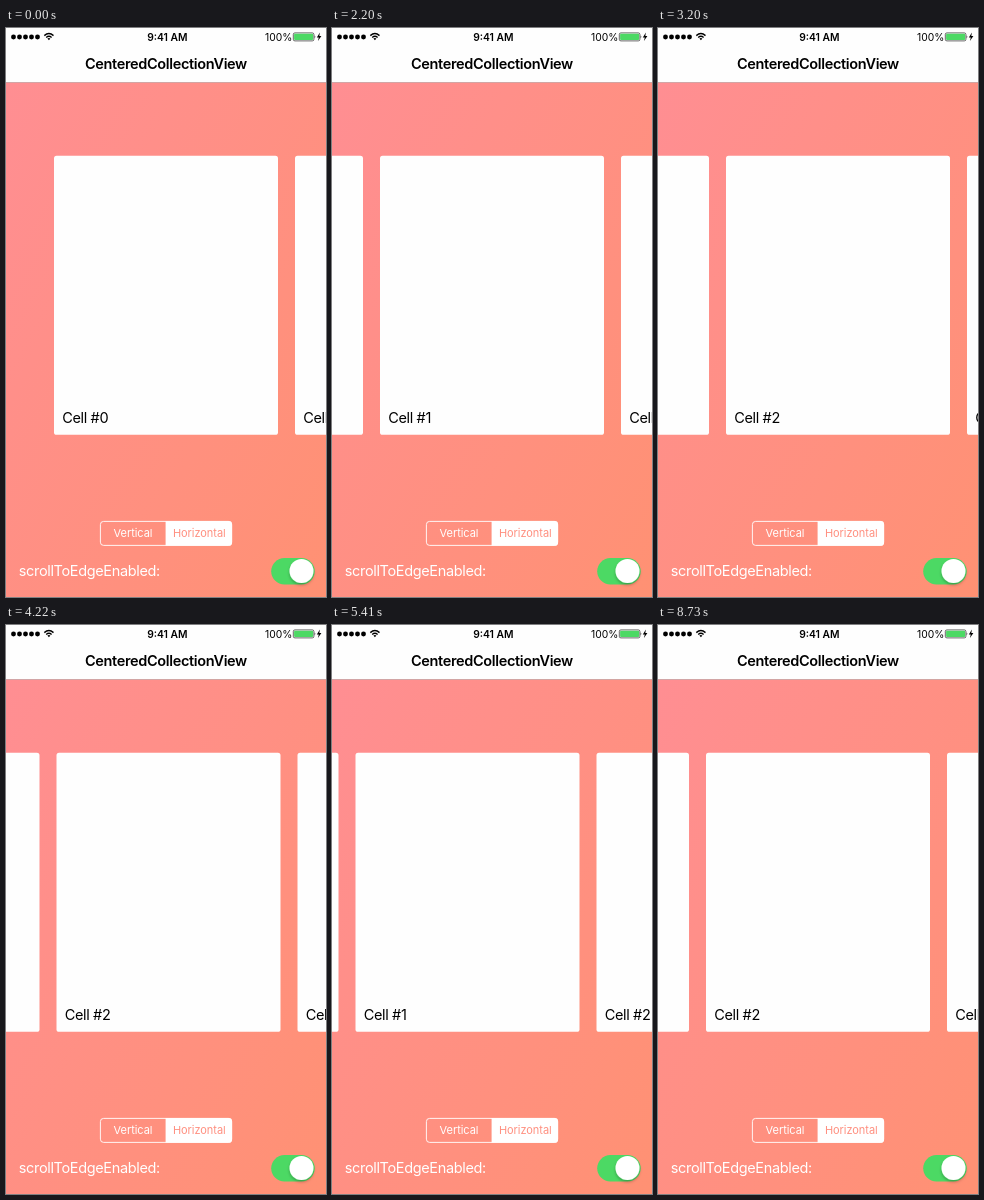
An HTML page that plays this animation: 320x569 px, repeating every 8780 ms.

```html
<!DOCTYPE html>
<html lang="en">
<head>
<meta charset="utf-8">
<title>CenteredCollectionView</title>
<style>
  html, body { margin: 0; width: 100%; height: 100%; overflow: hidden; }
  svg { display: block; width: 320px; height: 569px; }
  text { font-family: Inter, sans-serif; font-size: 14.5px; letter-spacing: -.35px; }
  .small { font-size: 11px; letter-spacing: -.05px; text-anchor: middle; }
  .status { font-size: 10.3px; letter-spacing: 0; }
  .bold { font-weight: 600; text-anchor: middle; }
</style>
</head>
<body>
<svg viewBox="0 0 320 569">
  <defs>
    <linearGradient id="coral" x1="0" y1="0" x2="1" y2="1">
      <stop offset="0" stop-color="#ff8e94"/>
      <stop offset="1" stop-color="#ff9173"/>
    </linearGradient>
    <filter id="soft" x="-30%" y="-30%" width="160%" height="170%">
      <feDropShadow dx="0" dy="1.8" stdDeviation="1.4" flood-opacity=".28"/>
    </filter>
  </defs>
  <rect width="320" height="569" fill="url(#coral)"/>
  <g id="cells"></g>

  <rect width="320" height="54.2" fill="#fefefe"/>
  <rect y="54" width="320" height=".6" fill="#b5a5a5"/>
  <text class="bold" x="160" y="41">CenteredCollectionView</text>

  <g id="dots"></g>
  <g fill="none" stroke="#000" stroke-width="1.4">
    <path d="M38.3 7.6Q42.9 3.6 47.5 7.6M40.2 9.5Q42.9 7.2 45.6 9.5"/>
    <path d="M41.4 10.6Q42.9 9.4 44.4 10.6L42.9 12.2Z" fill="#000" stroke="none"/>
  </g>
  <text class="status bold" x="161.3" y="12.7">9:41 AM</text>
  <text class="status" x="259" y="12.7">100%</text>
  <rect x="287.3" y="4.9" width="20.6" height="8" rx="1.6" fill="none" stroke="#000" stroke-width=".6"/>
  <rect x="288.1" y="5.7" width="19" height="6.4" rx=".8" fill="#4cd964"/>
  <path d="M308.7 7.3q1.3 1.6 0 3.2z"/>
  <path d="M313.9 4.6L310.8 9.4H312.8L311.9 13L315.4 8H313.3Z"/>

  <rect x="94.4" y="493.4" width="131.2" height="24" rx="3.2" fill="none" stroke="#fff" stroke-width=".9"/>
  <path d="M159.6 493h63.1a3.4 3.4 0 0 1 3.4 3.4v18a3.4 3.4 0 0 1-3.4 3.4h-63.1z" fill="#fff"/>
  <text class="small" x="127" y="509.4" fill="#fff">Vertical</text>
  <text class="small" x="193.3" y="509.4" fill="#ff9080">Horizontal</text>

  <text x="12.8" y="548.3" fill="#fff">scrollToEdgeEnabled:</text>
  <rect x="265.2" y="530" width="43.5" height="26.5" rx="13.25" fill="#4cd964"/>
  <circle cx="295.5" cy="543.1" r="12" fill="#fff" filter="url(#soft)"/>
</svg>
<script>
const LOOP = 8780, PITCH = 241, RELEASE = 0.4;
const cells = document.getElementById('cells');

for (let i = 0; i < 4; i++) {
  cells.innerHTML += `<g transform="translate(${48 + i * PITCH} 127.8)">
    <rect width="224" height="279" rx="2.6" fill="#fefefe"/>
    <text x="8.2" y="267.2">Cell #${i}</text></g>`;
}
for (let i = 0; i < 5; i++) {
  document.getElementById('dots').innerHTML += `<circle cx="${7.5 + i * 6}" cy="9" r="2.45"/>`;
}

// Each swipe: start time, direction, drag duration, deceleration constant (ms)
const swipes = [
  [1495, 1, 130, 90],
  [2920, 1, 113, 85],
  [4200, -1, 131, 98.5],
  [5272, 1, 200, 80],
];

// Accelerating drag, then an exponential glide at matching speed
function swipe(t, drag, tau) {
  if (t <= 0) return 0;
  if (t < drag) return RELEASE * (t / drag) ** ((1 - RELEASE) * drag / (RELEASE * tau));
  return 1 - (1 - RELEASE) * Math.exp((drag - t) / tau);
}

function draw() {
  const t = performance.now() % LOOP;
  const page = swipes.reduce((sum, [start, dir, drag, tau]) => sum + dir * swipe(t - start, drag, tau), 0);
  const x = Math.round(-page * PITCH * 2) / 2;
  cells.setAttribute('transform', `translate(${x} 0)`);
  requestAnimationFrame(draw);
}
draw();
</script>
</body>
</html>
```
